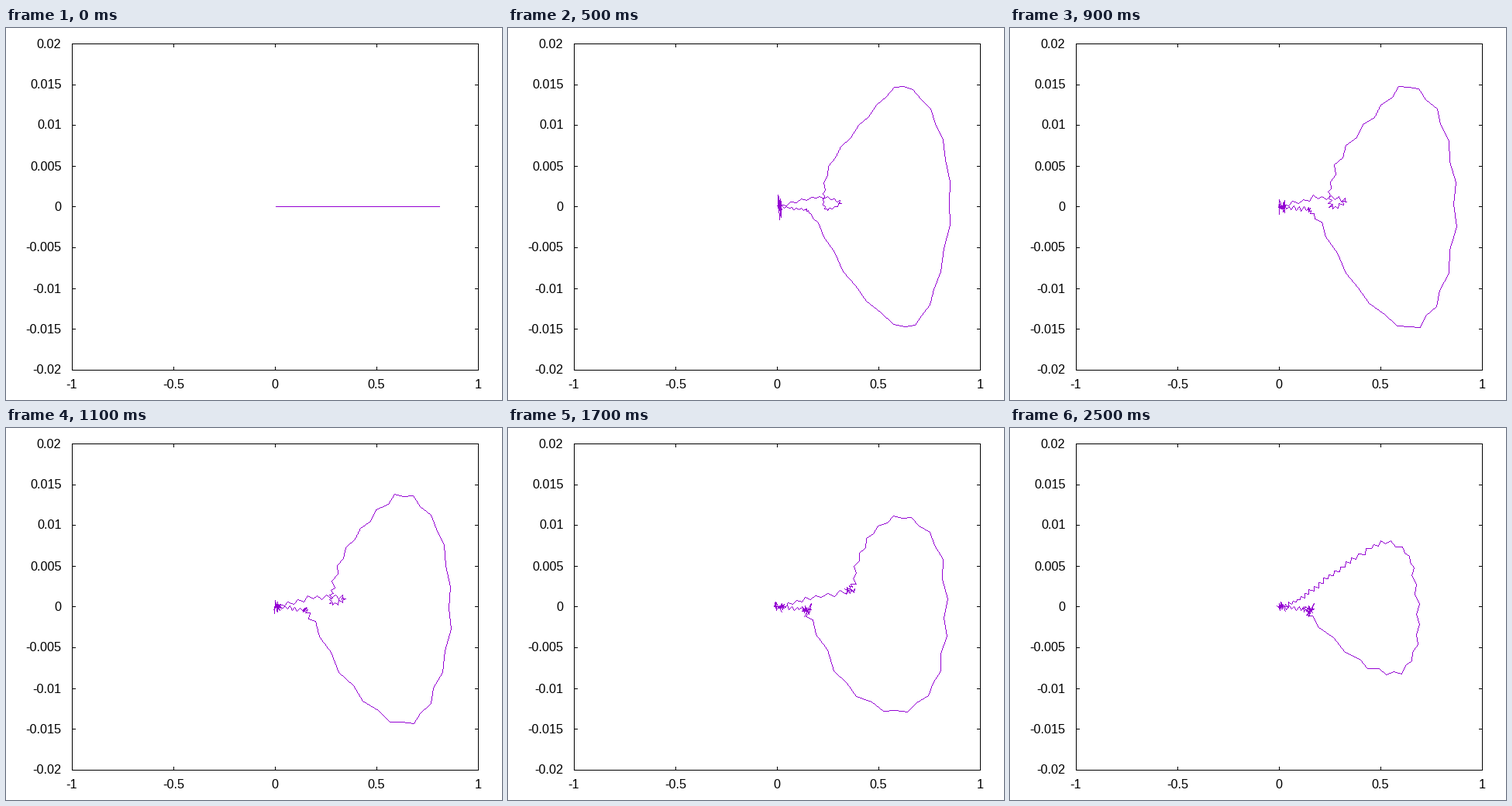
Recreate the animation shown at these times as a matplotlib script. Size 640 by 480 pixels, loop 2.6 s.

```python
import numpy as np
import matplotlib.pyplot as plt
from matplotlib.animation import FuncAnimation

W, H, DPI = 640, 480, 100
FRAMES, INTERVAL = 26, 100
LEFT, RIGHT, TOP, BOTTOM = 85, 609, 20, 441
ORIGIN = np.array([347, 230])
START, NECK = (350, 230), (385, 234)
PURPLE, BLACK = (148, 0, 211), (0, 0, 0)
GROWN = 8

# Outline of the loop at four moments: tail, hook, upper edge, top,
# right side, bottom, lower neck.
TIMES = [GROWN, 17, 21, 25]
OUTLINES = np.array([
    [(398, 218), (431, 224), (412, 234), (409, 208), (423, 165), (468, 110), (515, 70),
     (558, 120), (576, 225), (556, 340), (517, 390), (450, 336), (400, 252)],
    [(390, 219), (445, 210), (436, 210), (446, 200), (451, 170), (470, 135), (508, 113),
     (552, 150), (565, 245), (550, 330), (500, 366), (436, 330), (390, 248)],
    [(378, 217), (414, 203), (445, 197), (466, 179), (476, 167), (488, 156), (512, 151),
     (540, 182), (549, 250), (540, 308), (493, 353), (440, 315), (390, 246)],
    [(368, 223), (390, 208), (416, 188), (445, 168), (465, 154), (484, 147), (510, 160),
     (521, 190), (525, 240), (522, 290), (495, 317), (450, 299), (388, 244)],
], float)


def outline_at(frame):
    t = np.clip(frame, TIMES[0], TIMES[-1])
    i = min(np.searchsorted(TIMES, t, side="right"), len(TIMES) - 1) - 1
    s = (t - TIMES[i]) / (TIMES[i + 1] - TIMES[i])
    return (1 - s) * OUTLINES[i] + s * OUTLINES[i + 1]


def spline(knots, t):
    """Catmull-Rom curve through the knots at knot positions t."""
    p = np.vstack([knots[:1], knots, knots[-1:]])
    i = np.minimum(t.astype(int), len(knots) - 2)
    u = (t - i)[:, None]
    a, b, c, d = p[i], p[i + 1], p[i + 2], p[i + 3]
    return b + u / 2 * (c - a + u * (2 * a - 5 * b + 4 * c - d + u * (3 * (b - c) + d - a)))


def zigzag(points, amp, rng):
    """Push every other vertex to the other side of the curve."""
    tangent = np.gradient(points, axis=0)
    normal = tangent[:, ::-1] * (-1, 1) / (np.hypot(*tangent.T)[:, None] + 1e-9)
    side = (-1.0) ** np.arange(len(points)) * rng.uniform(.3, 1, len(points))
    return points + amp * side[:, None] * normal


def scribble(center, half_w, half_h, n, rng):
    dx = half_w * rng.uniform(-1, 1, n)
    dy = half_h * (-1.0) ** np.arange(n) * np.linspace(1, .3, n) ** 3
    return center + np.column_stack([dx, dy])


def curve(frame):
    rng = np.random.default_rng(40 + frame)
    knots = np.vstack([START, outline_at(frame), NECK])
    t = np.r_[np.arange(0, 4, 1 / 8), np.arange(4, 13, 1 / 4), np.linspace(13, 14, 7)]
    loop = zigzag(spline(knots, t), min(.4 * frame, 3.5), rng)

    tangle = 7 * np.clip((frame - GROWN) / 9, 0, 1)
    path = np.vstack([
        scribble(START, 2 + .3 * min(frame, 17), 6 + 40 * np.exp(-frame / 4), 24, rng),
        loop,
        scribble(NECK, tangle, 1.3 * tangle, 14, rng),
        zigzag(np.linspace(NECK, START, 12), min(.4 * frame, 3.5), rng),
    ]) - ORIGIN

    # The loop opens out of a flat segment and saturates.
    age = min(frame, GROWN)
    path *= (.926 + .074 * age / GROWN,
             (1 - np.exp(-.7 * age)) / (1 - np.exp(-.7 * GROWN)))
    if frame == 0:
        path[:, 0] = np.maximum(path[:, 0], 0)
    return path + ORIGIN


def stroke(image, points, color):
    """One-pixel line without smoothing."""
    points = np.rint(points).astype(int)
    for p, q in zip(points[:-1], points[1:]):
        x, y = np.rint(np.linspace(p, q, abs(q - p).max() + 1)).astype(int).T
        image[y, x] = color


fig = plt.figure(figsize=(W / DPI, H / DPI), dpi=DPI, facecolor="white")
ax = fig.add_axes([0, 0, 1, 1])
ax.axis("off")


def label(x, y, value, ha):
    ax.text(x, y, f"{value:g}", ha=ha, va="baseline", family="Liberation Sans",
            size=16.2 * 72 / DPI, color="black")


plot_box = np.full((H, W, 3), 255, np.uint8)
stroke(plot_box, [(LEFT, TOP), (RIGHT, TOP), (RIGHT, BOTTOM), (LEFT, BOTTOM), (LEFT, TOP)], BLACK)
for k in range(5):
    x = LEFT + 131 * k
    for y, step in ((TOP, 4), (BOTTOM, -4)):
        stroke(plot_box, [(x, y), (x, y + step)], BLACK)
    label(x, 465, -1 + .5 * k, "center")
for k in range(9):
    y = round(TOP + (BOTTOM - TOP) * k / 8)
    for x, step in ((LEFT, 4), (RIGHT, -4)):
        stroke(plot_box, [(x, y), (x + step, y)], BLACK)
    label(71.5, y + 5.5, (4 - k) * .005, "right")

picture = ax.imshow(plot_box, extent=(0, W, H, 0), aspect="auto", interpolation="nearest")


def draw(frame):
    image = plot_box.copy()
    stroke(image, curve(frame), PURPLE)
    picture.set_data(image)
    return picture,


anim = FuncAnimation(fig, draw, frames=FRAMES, interval=INTERVAL, repeat=True, repeat_delay=0)
plt.show()
```
